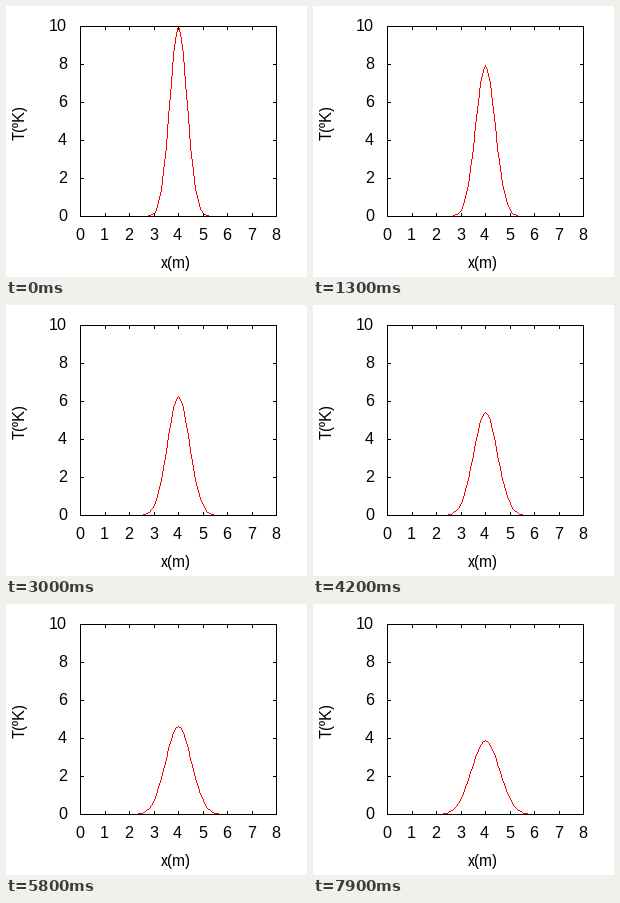
Animation, 301 px wide and 271 px high, one loop 8000 ms. Source, as a matplotlib script:

```python
import numpy as np
import matplotlib.pyplot as plt
from matplotlib.animation import FuncAnimation

W, H, DPI = 301, 271, 64
FRAMES, INTERVAL = 80, 100
LEFT, RIGHT, TOP, BOTTOM = 74, 270, 20, 210
X_UNIT, Y_UNIT = 24.5, 19.04
TICK = 3
BLACK, RED = (0, 0, 0), (255, 0, 0)

plt.rcParams.update({
    "font.family": "Liberation Sans",
    "text.hinting": "native",
    "text.hinting_factor": 1,
})

fig = plt.figure(figsize=(W / DPI, H / DPI), dpi=DPI, facecolor="white")
ax = fig.add_axes([0, 0, 1, 1])
ax.axis("off")


def snap(v):
    return np.floor(np.asarray(v) + 0.5).astype(int)


def label(x, y, text, ha="center", **kw):
    ax.text(x, y, text, ha=ha, va="baseline", fontsize=16 * 72 / DPI,
            color="black", **kw)


def draw_frame(img):
    img[TOP:BOTTOM + 1, [LEFT, RIGHT]] = BLACK
    img[[TOP, BOTTOM], LEFT:RIGHT + 1] = BLACK
    for x in snap(LEFT + X_UNIT * np.arange(9)):
        img[TOP:TOP + TICK + 1, x] = BLACK
        img[BOTTOM - TICK:BOTTOM + 1, x] = BLACK
    for y in BOTTOM - 19 * np.arange(0, 11, 2):
        img[y, LEFT:LEFT + TICK + 1] = BLACK
        img[y, RIGHT - TICK:RIGHT + 1] = BLACK


def draw_polyline(img, xs, ys):
    """Hard-edged line, one pixel wide."""
    for x0, y0, x1, y1 in zip(xs, ys, xs[1:], ys[1:]):
        n = max(abs(x1 - x0), abs(y1 - y0)) + 1
        img[snap(np.linspace(y0, y1, n)), snap(np.linspace(x0, x1, n))] = RED


# Slice through a spreading two-dimensional heat pulse
def temperature(x, t):
    spread = 1 + 0.2 * t
    return 10 / spread * np.exp(-4 * (x - 4) ** 2 / spread)


grid = np.linspace(0, 8, 81)
grid_px = snap(LEFT + grid * X_UNIT)


def plot_at(t):
    img = np.full((H, W, 3), 255, np.uint8)
    draw_polyline(img, grid_px, BOTTOM - snap(temperature(grid, t) * Y_UNIT))
    draw_frame(img)
    return img


picture = ax.imshow(plot_at(0), extent=(0, W, H, 0), aspect="auto",
                    interpolation="nearest")

for n in range(9):
    label(snap(LEFT + n * X_UNIT) - 0.5, 234, str(n))
for n in range(0, 11, 2):
    label(61, BOTTOM - 19 * n + 5, str(n), ha="right")
label(169.5, 262, "x(m)")
label(19, 117, "T(\u00baK)", rotation=90, rotation_mode="anchor")


def update(i):
    picture.set_data(plot_at(i * INTERVAL / 1000))
    return picture,


anim = FuncAnimation(fig, update, frames=FRAMES, interval=INTERVAL,
                     repeat=True, repeat_delay=0, blit=False)
plt.show()
```
